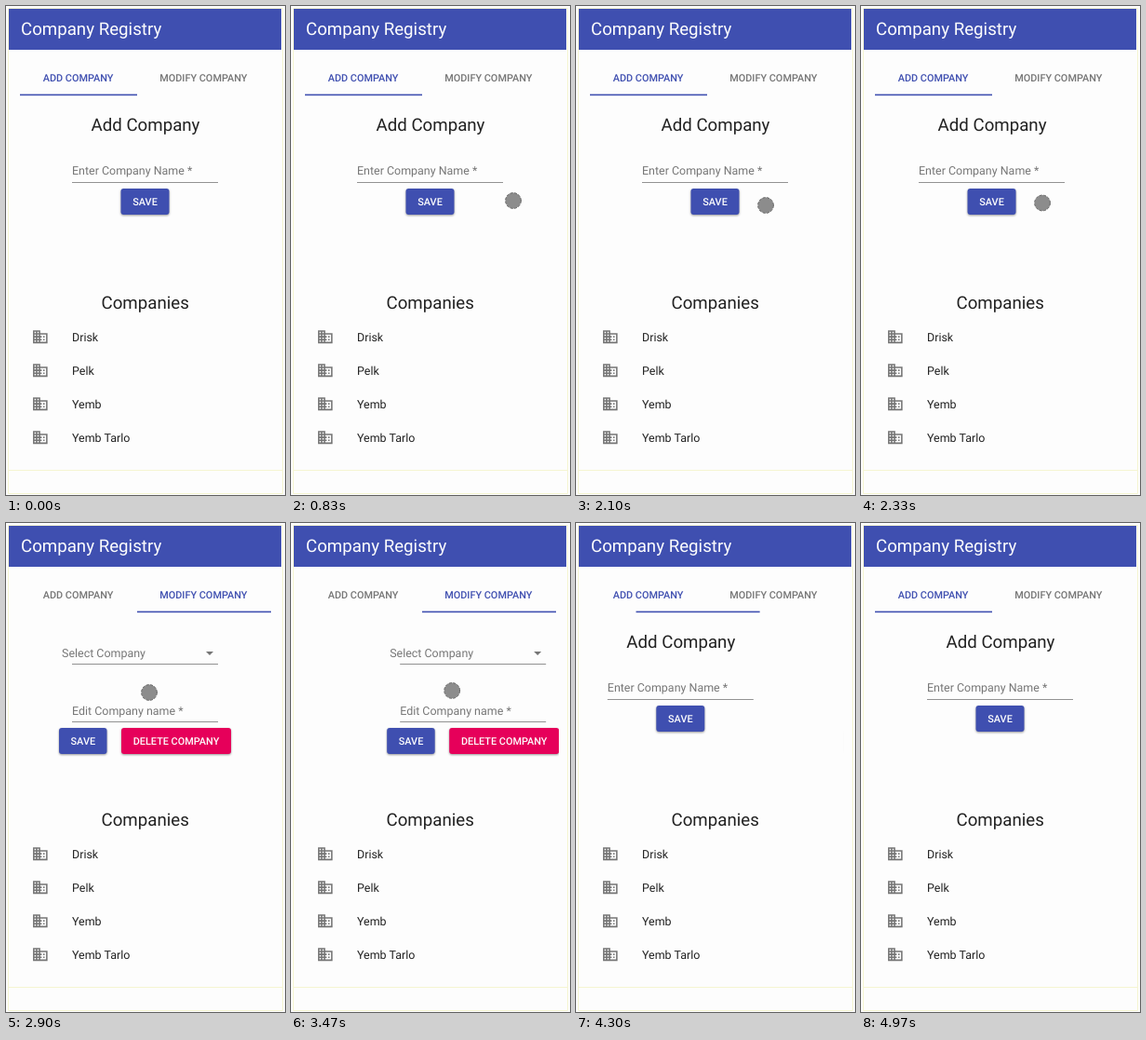
Animation of 300x525 px, one loop 5.01 s. Source, as an HTML page:

```html
<!DOCTYPE html>
<html lang="en">
<head>
<meta charset="utf-8">
<style>
  html, body { margin: 0; width: 100%; height: 100%; overflow: hidden; background: #fdfdfd; }
  svg { display: block; width: 300px; height: 525px; }
  text { font: 12.46px Roboto, sans-serif; fill: #212121; text-rendering: geometricPrecision; }
  .head { font-size: 18.7px; }
  .mid { text-anchor: middle; }
  .caps { font-size: 10.9px; font-weight: 500; text-anchor: middle; }
  .hint { fill: #777; }
  .light { fill: #fdfdfd; }
  .tab { fill: #757575; }
  .tab.on, .blue { fill: #3f4fb0; }
  .red { fill: #e6005a; }
  .rule { fill: none; stroke: #929292; stroke-width: 1; }
  .edge { fill: none; stroke: #f5f5d2; stroke-width: 1; }
  .icon { fill: #757575; }
  .btn rect { filter: drop-shadow(0 1.2px 1.2px rgba(0, 0, 0, .4)); }
</style>
</head>
<body>
<svg viewBox="0 0 300 525">
  <defs>
    <clipPath id="view"><rect x="12" y="99" width="276" height="190"/></clipPath>
    <path id="building" transform="scale(.779)" d="M12 7V3H2v18h20V7H12zM6 19H4v-2h2v2zm0-4H4v-2h2v2zm0-4H4V9h2v2zm0-4H4V5h2v2zm4 12H8v-2h2v2zm0-4H8v-2h2v2zm0-4H8V9h2v2zm0-4H8V5h2v2zm10 12h-8v-2h2v-2h-2v-2h2v-2h-2V9h8v10zm-2-8h-2v2h2v-2zm0 4h-2v2h2v-2z"/>
  </defs>

  <path class="edge" d="M2.5 2.5H297.5V523.5H2.5ZM2.5 498.5H297.5"/>
  <rect class="blue" x="3" y="3" width="293" height="44"/>
  <text class="head light" x="16" y="31">Company Registry</text>

  <text class="caps tab" x="77.6" y="81">ADD COMPANY</text>
  <text class="caps tab" x="212.3" y="81">MODIFY COMPANY</text>
  <rect id="bar" class="blue" y="94.6" height="1.6"/>

  <g clip-path="url(#view)">
    <g id="slides">
      <text class="head mid" x="150" y="133.5">Add Company</text>
      <text class="hint" x="71" y="181">Enter Company Name *</text>
      <path class="rule" d="M71 189.5H228"/>
      <g class="btn">
        <rect class="blue" x="123.5" y="196" width="52" height="28" rx="3"/>
        <text class="caps light" x="149.5" y="214">SAVE</text>
      </g>
      <g transform="translate(270)">
        <text class="hint" x="60" y="144">Select Company</text>
        <path d="M215 138h8l-4 4z" fill="#757575"/>
        <path class="rule" d="M71 151.5H228"/>
        <text class="hint" x="71" y="206">Edit Company name *</text>
        <path class="rule" d="M71 213.5H228"/>
        <g class="btn">
          <rect class="blue" x="57" y="220" width="51.5" height="28" rx="3"/>
          <text class="caps light" x="82.8" y="238">SAVE</text>
          <rect class="red" x="124" y="220" width="118" height="28" rx="3"/>
          <text class="caps light" x="183" y="238">DELETE COMPANY</text>
        </g>
      </g>
    </g>
  </g>

  <text class="head mid" x="149.7" y="325">Companies</text>
  <g id="list"></g>
  <circle id="dot" r="8.4" fill="#8c8c8c" stroke="#686868" stroke-width="1" stroke-dasharray="3 1.5"/>
</svg>
<script>
const LOOP = 5010, WIDTH = 270;
const DRAG = 2250, RELEASE = 2550, DRAG_BACK = 3230, RELEASE_BACK = 4182;
const GRAB = 204, DROP = 154, GRAB_BACK = 127, DROP_BACK = 272;
const $ = id => document.getElementById(id);
const bar = $('bar'), slides = $('slides'), dot = $('dot');
const tabs = document.querySelectorAll('.tab');

$('list').innerHTML = ['Drisk', 'Pelk', 'Yemb', 'Yemb Tarlo'].map((name, i) =>
  `<use href="#building" class="icon" transform="translate(27.5 ${345.8 + 36 * i})"/>
   <text x="71" y="${359.5 + 36 * i}">${name}</text>`).join('');

// Touch point: time, x, y
const touch = [
  [480, 247, 206], [830, 239, 209], [1060, 216, 212], [2100, GRAB, 214],
  [DRAG, GRAB, 214], [RELEASE, DROP, 200], [2900, DROP, 182], [DRAG_BACK, GRAB_BACK, 180],
  [3450, 174, 180], [3720, GRAB_BACK, 178], [3940, GRAB_BACK, 178],
  [RELEASE_BACK, DROP_BACK, 182], [4290, 300, 186]
];

const mix = (a, b, p) => a + (b - a) * p;

function bezier(x1, y1, x2, y2) {
  const at = (a, b, s) => 3 * (1 - s) ** 2 * s * a + 3 * (1 - s) * s * s * b + s ** 3;
  return x => {
    if (x <= 0) return 0;
    if (x >= 1) return 1;
    let lo = 0, hi = 1;
    for (let i = 0; i < 24; i++) {
      const s = (lo + hi) / 2;
      if (at(x1, x2, s) < x) lo = s; else hi = s;
    }
    return at(y1, y2, lo);
  };
}
const barEase = bezier(.4, 0, .2, 1);
const slideEase = bezier(.15, .3, .25, 1);

function touchAt(t) {
  const i = touch.findIndex(k => k[0] > t);
  if (i < 1) return null;
  const [t0, x0, y0] = touch[i - 1], [t1, x1, y1] = touch[i];
  const u = (t - t0) / (t1 - t0), p = u * u * (3 - 2 * u);
  return { x: mix(x0, x1, p), y: mix(y0, y1, p) };
}

// Content follows the finger, then settles after release
function slideAt(t, finger) {
  if (t < DRAG) return 0;
  if (t < RELEASE) return finger.x - GRAB;
  if (t < DRAG_BACK) return mix(DROP - GRAB, -WIDTH, slideEase((t - RELEASE) / 350));
  if (t < RELEASE_BACK) return finger.x - GRAB_BACK - WIDTH;
  return mix(DROP_BACK - GRAB_BACK - WIDTH, 0, slideEase((t - RELEASE_BACK) / 350));
}

function draw(t) {
  const finger = touchAt(t);
  dot.style.display = finger ? '' : 'none';
  if (finger) dot.setAttribute('transform', `translate(${finger.x} ${finger.y})`);
  slides.setAttribute('transform', `translate(${slideAt(t, finger)})`);

  const p = barEase((t - RELEASE) / 300) - barEase((t - RELEASE_BACK) / 300);
  bar.setAttribute('x', mix(15, 141, p));
  bar.setAttribute('width', mix(126, 144, p));
  const modify = t >= RELEASE && t < RELEASE_BACK;
  tabs[0].classList.toggle('on', !modify);
  tabs[1].classList.toggle('on', modify);
}

const start = performance.now();
function tick() {
  draw((performance.now() - start) % LOOP);
  requestAnimationFrame(tick);
}
tick();
</script>
</body>
</html>
```
